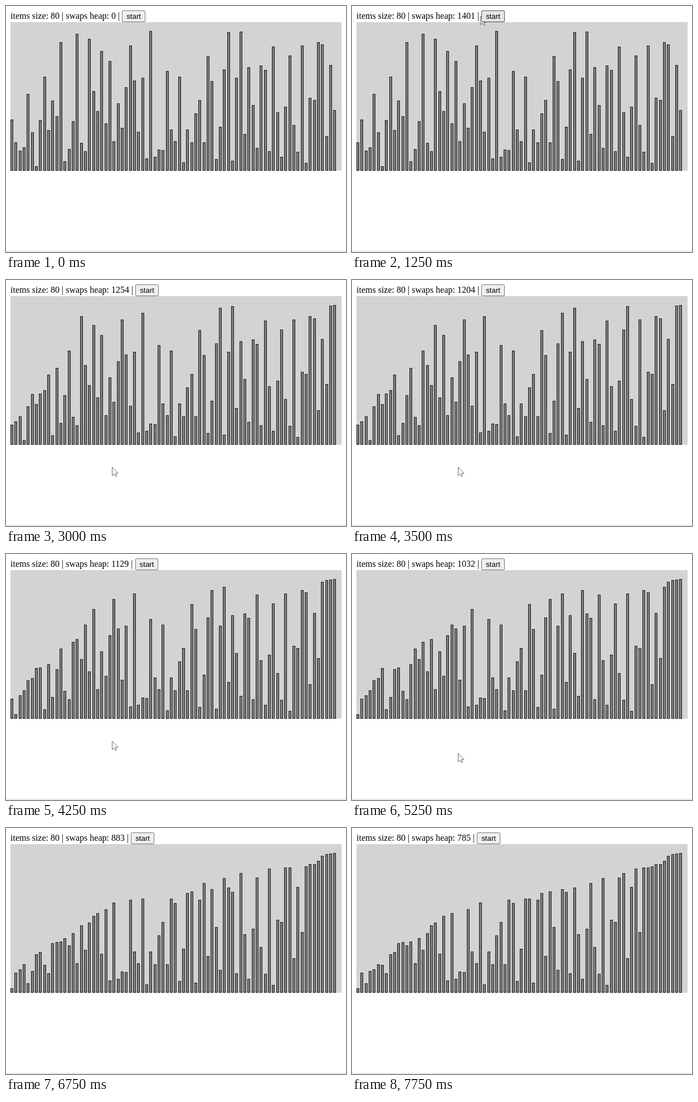
An HTML page with a canvas for the animation above (8 s loop, 610 by 442 pixels).

```html
<!DOCTYPE html>
<html>
<head>
<meta charset="utf-8">
<style>
html, body { margin: 0; width: 100%; height: 100%; overflow: hidden; background: #fff; }
#bar { position: absolute; left: 8px; top: 8px; white-space: pre; font: 16px "Liberation Serif", serif; color: #000; }
button { margin: 0; padding: 2px 7px; border: 1px solid #767676; border-radius: 2px; background: #efefef; color: #000; font: 13.333px "Liberation Sans", sans-serif; }
button.hot { background: #e5e5e5; border-color: #4f4f4f; }
canvas { position: absolute; left: 0; top: 0; }
</style>
</head>
<body>
<canvas id="stage" width="610" height="442"></canvas>
<div id="bar">items size: 80 | swaps heap: <span id="left">0</span> | <button id="start">start</button></div>
<script>
const LOOP = 8000, STEP = 250, TOTAL = 1402, FLOOR = 296;
const $ = id => document.getElementById(id);
const ctx = $('stage').getContext('2d');
const arrow = new Path2D('M.5 .5V15.5L4 12.2L6.4 17L8.6 16L6.3 11.3H11Z');

// Top edge of each bar before sorting
const tops = [
  204, 245, 260, 254, 158, 227, 288, 205, 127, 223, 170, 198, 65, 279, 257, 207,
  50, 246, 261, 59, 153, 189, 81, 211, 99, 243, 175, 219, 146, 71, 134, 226,
  129, 274, 45, 271, 258, 259, 117, 222, 243, 127, 281, 222, 245, 193, 169, 245,
  90, 135, 275, 217, 114, 47, 278, 129, 46, 230, 110, 178, 255, 107, 115, 261,
  73, 191, 271, 181, 89, 214, 262, 71, 282, 165, 169, 65, 69, 234, 106, 187
];

// [time, swaps done]
const swapKeys = [[1250, 1], [1500, 3], [2000, 52], [3000, 148], [4250, 273], [5250, 370], [6750, 519], [7750, 617]];
// [time, x, y] of the pointer
const pointerKeys = [[250, 567, 366], [1000, 230, 18], [1250, 230, 18], [1500, 226, 90], [2000, 202, 306],
  [2500, 190, 332], [2750, 190, 336], [4500, 190, 336], [4750, 190, 358], [6250, 190, 358]];

function sample(keys, t) {
  const i = Math.max(1, keys.findIndex(k => k[0] >= t));
  const a = keys[i - 1], b = keys[i];
  const u = (t - a[0]) / (b[0] - a[0]);
  return a.slice(1).map((v, j) => Math.round(v + (b[j + 1] - v) * u));
}

function bubble(swaps) {
  const list = tops.slice();
  for (let end = list.length - 1; end > 0; end--) {
    for (let i = 0; i < end; i++) {
      if (list[i] >= list[i + 1]) continue;
      if (swaps-- <= 0) return list;
      [list[i], list[i + 1]] = [list[i + 1], list[i]];
    }
  }
  return list;
}

function rect(color, x, y, w, h) {
  ctx.fillStyle = color;
  ctx.fillRect(x, y, w, h);
}

function draw(t) {
  const running = t >= swapKeys[0][0];
  const done = running ? sample(swapKeys, t)[0] : 0;
  $('left').textContent = running ? TOTAL - done : 0;
  $('start').className = t >= 1000 && t <= 1250 ? 'hot' : '';

  rect('#fff', 0, 0, 610, 442);
  rect('#e2e2e2', 0, 440, 610, 1);
  rect('#f0f0f0', 0, 441, 610, 1);
  rect('#d3d3d3', 8, 29, 594, 267);
  bubble(done).forEach((top, i) => {
    const x = Math.round(8 + i * 22 / 3);
    rect('#1a1a1a', x, top, 5, FLOOR - top);
    rect('#808080', x + 1, top + 1, 3, FLOOR - top - 2);
  });

  if (t >= 250 && t <= 6250) {
    const [x, y] = sample(pointerKeys, t);
    ctx.save();
    ctx.translate(x, y);
    ctx.fillStyle = '#fff';
    ctx.strokeStyle = '#444';
    ctx.lineWidth = 0.8;
    ctx.fill(arrow);
    ctx.stroke(arrow);
    ctx.restore();
  }
}

let shown = -1;
function tick() {
  const t = Math.floor(performance.now() % LOOP / STEP) * STEP;
  if (t !== shown) draw(shown = t);
  requestAnimationFrame(tick);
}
tick();
</script>
</body>
</html>
```
